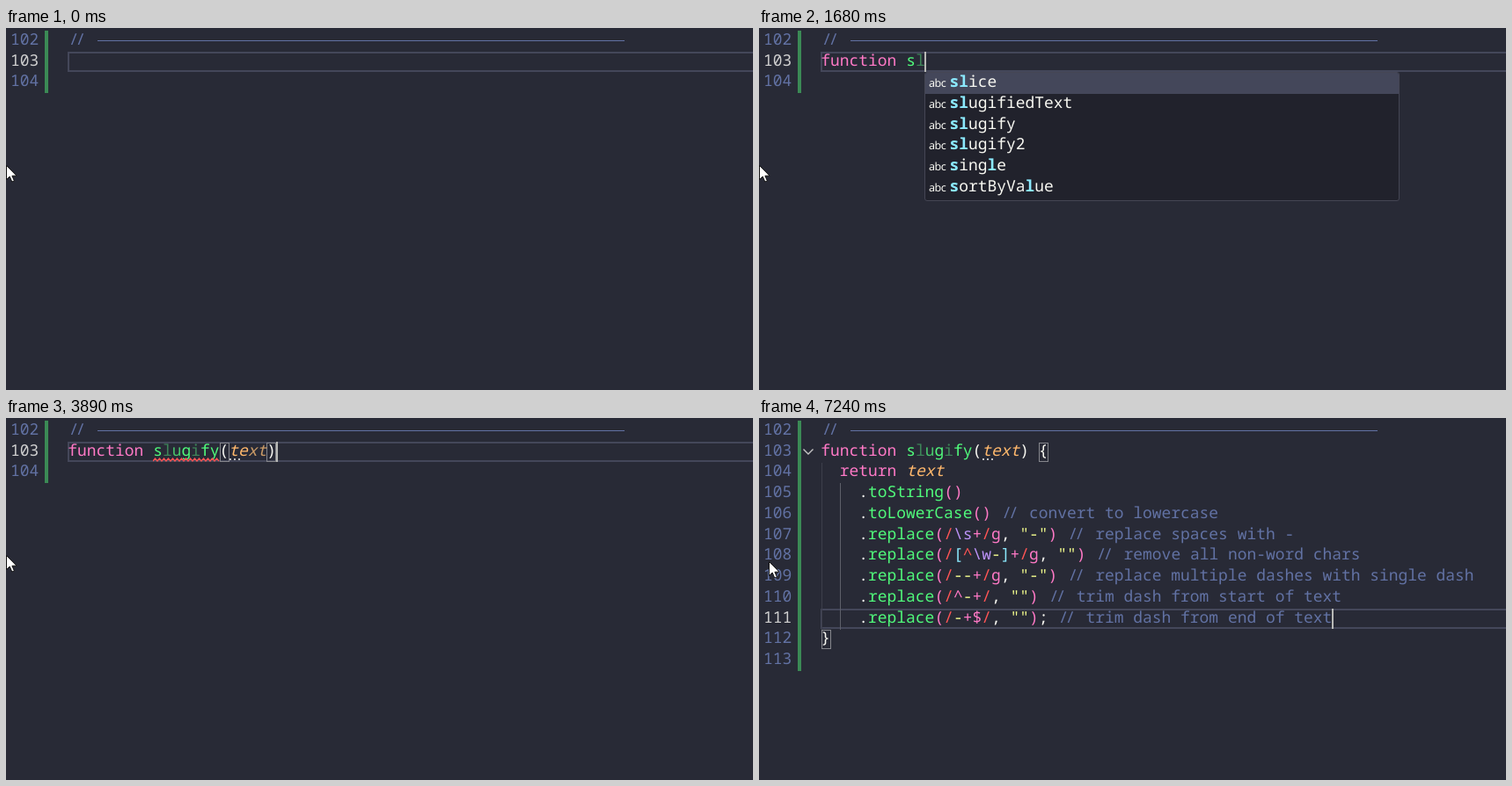
Write an HTML page that moves like this. It is 849x412 px and loops after 7310 ms.

```html
<!DOCTYPE html>
<html lang="en">
<head>
<meta charset="utf-8">
<title>Typing a slugify function</title>
<style>
  html, body { margin: 0; width: 100%; height: 100%; overflow: hidden; background: #282a36; }
  #stage {
    position: relative; width: 849px; height: 412px; overflow: hidden; background: #282a36;
    font: 17.93px/23.75px "Noto Sans Mono", "DejaVu Sans Mono", monospace;
    text-rendering: geometricPrecision; font-variant-ligatures: none; color: #f8f8f2;
  }
  #stage div, #stage span, #stage svg { position: absolute; white-space: pre; box-sizing: border-box; }
  #stage .hit { position: static; color: #8be9fd; font-weight: 700; }
  .w { color: #f8f8f2 } .p { color: #ff79c6 } .g { color: #50fa7b } .m { color: #48c56b }
  .h { color: #3d8458 } .r { color: #ff5555 } .v { color: #bd93f9 } .b { color: #8be9fd }
  .y { color: #f1fa8c } .c, .slash { color: #6272a4 } .ghost { color: #707179 }
  .o, .d, .q { color: #ffb86c; font-style: italic } .d { color: #a8825c } .q { color: #c99a66 }
  .slash { letter-spacing: -3px; padding-left: 1.5px }
  .num { left: 5px; color: #6272a4 } .num.on { color: #d0d0d0 }
  .bar { left: 44px; width: 4px; background: #3b8a55 }
  .row { left: 70px; width: 800px; height: 23px; border: 2px solid #44475a }
  .caret { width: 2px; height: 23px; background: #b8b9b6 }
  .match { width: 11px; height: 22px; border: 1px solid #85868c }
  .guide { width: 1px; background: #3c3e4a } .guide.on { background: #5d5f69 }
  .rule { left: 104px; top: 14px; width: 599px; height: 1px; background: #6272a4 }
  .dots { width: 13px; height: 2px; background: repeating-linear-gradient(90deg, #c0c0c0 0 2px, transparent 2px 5px) }
  .pop { top: 50px; width: 540px; background: #21222c; border: 1px solid #454654; border-radius: 3px; overflow: hidden }
  .item { left: 0; width: 538px; height: 23.75px } .item.sel { background: #44475a }
  .label { left: 27.5px; top: -.8px; font-weight: 500 }
  .info { right: 13px; top: -.8px; font-size: 15.2px; font-weight: 600; color: #adaeb0 }
  .abc { left: 4px; top: 0; font: 500 12.5px/23.75px "Noto Sans", sans-serif; letter-spacing: -.5px }
  .thumb { right: 0; top: 0; width: 13px; height: 193px; background: rgba(120, 122, 132, .28) }
  .ico { left: 2.5px; top: 2.5px; width: 20px; height: 20px; fill: none; stroke: #f8f8f2 }
  .ico.var { stroke: #75beff }
</style>
</head>
<body>
<div id="stage"><div id="view"></div>
  <svg id="mouse" width="16" height="24" viewBox="-1 -1 16 24" style="left:-1px">
    <path d="M.5.5V16.5L4.2 13 6.8 19 9.4 18 6.9 12.2H12z" fill="#fff" stroke="#111" />
  </svg>
</div>
<script>
const CW = 10.76, LH = 23.75, X0 = 71, Y0 = 3, LOOP = 7310;
const x = col => X0 + col * CW, y = row => Y0 + row * LH;
const raw = String.raw;

// Markup: @k starts a run in colour class k; @/ is a tight comment mark.
const note = text => `@/// @c${text}`;
const call = (re, str, end, text) =>
  `@w.@greplace@p(@r/${re}@w, @y"${str}"@p)@w${end} ${note(text)}`;
const BODY = [
  '@preturn @wtext',
  '@w.@gtoString@p()',
  '@w.@gtoLowerCase@p() ' + note('convert to lowercase'),
  call(raw`@v\s@p+@r/@pg`, '-', '', 'replace spaces with -'),
  call(raw`@b[@r^@v\w@y-@b]@p+@r/@pg`, '', '', 'remove all non-word chars'),
  call('@y--@p+@r/@pg', '-', '', 'replace multiple dashes with single dash'),
  call('@p^@y-@p+@r/', '', '', 'trim dash from start of text'),
  call('@y-@p+$@r/', '', ';', 'trim dash from end of text')
];
const NAME = ['@gs', '@hl', '@mu', '@gg', '@hi', '@gf', '@gy'];
const fn = n => '@pfunction ' + NAME.slice(0, n).join('');
const sig = arg => `${fn(7)}@w(${arg}@w)`;

// Suggestions: icon letter, label, optional detail.
const FUNC = ['k function', 's function|Function Statement', 'v Function',
  's async function|Async Function Statement', 'v netlifyFunctions|@astrojs/netlify',
  'v __isOptionsFunction|@tailwindcss/typography', 'v __isOptionsFunction|@tailwindcss/forms',
  'v netlifyEdgeFunctions|@astrojs/netlify', 's async arrow function|Async Function Expression',
  'v SVGComponentTransferFunctionElement'];
const FU = [...FUNC, 'v fullscreenElement', 'v fullscreenEnabled'];
const SL = ['a slice', 'a slugifiedText', 'a slugify', 'a slugify2', 'a single', 'a sortByValue'];
const TE = ['a text', 's test|testBlock', 's testa|testAsyncBlock', 'a the', 'a then', 'a timeZone',
  'a true', 'a typeof', 's tsrce|typescriptReactClassExportComponent', 'a toLowerCase',
  'a toUpperCase', 's tsrcredux|typescriptReactClassComponentRedux'];
const TEX = ['a text', 'a textContent', 'a slugifiedText'];
const ICONS = {
  k: ['', 'M10 3.5h5M12 6.5h2M1 6.5h9M1 12.5h11M1 9.5h6M10 9.5h5M1.5 2.5h6v2h-6z'],
  s: ['', 'M2.5 13V1.5h12V13M2 14.5h1m1 0h1m1 0h1m1 0h1m1 0h1m1 0h1m1 0h1'],
  v: ['var', 'M4 4.5H1.5v7H4M12 4.5h2.5v7H12M5 7.2l3.7-1.8 2.5 1.2v2.6l-3.8 2L5 10zl2.4 1.2 3.8-1.8M7.4 8.4v2.8']
};

// Each step changes part of the state; col is the caret column, match the boxed brackets.
const type = (code, col, word, list) => ({ code, col, word, list, caret: true });
const STEPS = [
  [0, { code: '', row: 1, col: 0, match: [], nums: 3 }],
  [260, type('@wf', 1)],
  [350, type('@wf', 1, 'f', FU)],
  [440, type('@wfu', 2, 'f', FU)],
  [530, type('@wfu', 2, 'fu', FU)],
  [670, type('@wfun', 3, 'fun', FU)],
  [800, type('@wfunc', 4, 'func', FUNC)],
  [1020, type('@wfunct', 5, 'funct', FUNC)],
  [1080, type('@wfuncti', 6, 'functi', FUNC)],
  [1150, type('@wfunctio', 7, 'functio', FUNC)],
  [1210, type(fn(0), 8, 'function', FUNC)],
  [1420, type(fn(0), 9)],
  [1550, type(fn(1), 10, 's', SL)],
  [1680, type(fn(2), 11, 'sl', SL)],
  [1810, type(fn(3), 12, 'slu', SL.slice(1, 4))],
  [1940, type(fn(4), 13, 'slug', SL.slice(1, 4))],
  [2070, type(fn(5), 14, 'slugi', SL.slice(1, 4))],
  [2200, type(fn(7), 16, 'slugify', SL.slice(2, 4))],
  [2460, type(sig(''), 17)],
  [2530, { match: [[1, 16], [1, 17]] }],
  [2730, { ...type(sig('@ot'), 18), match: [[1, 16], [1, 18]] }],
  [2800, { word: 't', list: TE }],
  [2870, { ...type(sig('@ote'), 19, 'te', TE), match: [[1, 16], [1, 19]] }],
  [2940, { ...type(sig('@otex'), 20, 'te', TE), match: [[1, 16], [1, 20]] }],
  [3010, { word: 'tex', list: TEX }],
  [3360, { ...type(sig('@otext'), 21, 'text', [TEX[0], TEX[2]]), match: [[1, 16], [1, 21]] }],
  [3430, { code: sig('@ote@qxt'), wave: true, dots: true }],
  [3890, type(sig('@ote@qxt'), 22)],
  [4290, type(sig('@ote@qxt') + ' ', 23)],
  [4380, { match: [] }],
  [4490, type(sig('@ote@qxt') + ' {}', 24)],
  [4560, { match: [[1, 23], [1, 24]] }],
  [4840, { ...type(sig('@ote@qxt') + ' {', 2), row: 2, nums: 5, close: 3, match: [[1, 23], [3, 0]] }],
  [4910, { ghost: true, wave: false, close: 10, match: [[1, 23], [10, 0]] }],
  [5110, { fold: true }],
  [5310, { code: sig('@dtext') + ' {', caret: false }],
  [5770, { ghost: false, body: BODY, nums: 12, row: 9, col: 54, caret: true }],
  [5900, { guides: true }],
  [6230, { code: sig('@otext') + ' {' }],
  [6330, { body: ['@preturn @otext', ...BODY.slice(1)] }],
  [6430, { caret: false }],
  [6890, { caret: true }],
  [7240, { moved: true }]
];
let state = {};
const STATES = STEPS.map(([t, change]) => [t, state = { ...state, ...change }]);

const box = (cls, left, top, style = '', inner = '') =>
  `<div class="${cls}" style="left:${left}px;top:${top}px;${style}">${inner}</div>`;

function text(row, col, markup, force) {
  const parts = markup.split(/@(.)/);
  let html = '';
  for (let i = 1; i < parts.length; i += 2) {
    const cls = force || (parts[i] === '/' ? 'slash' : parts[i]);
    html += box(cls, x(col) - .7, y(row) - 1.2, '', parts[i + 1]);
    col += parts[i + 1].length;
  }
  return html;
}

function highlight(label, word) {
  const low = label.toLowerCase(), start = low.indexOf(word);
  let n = 0;
  return [...label].map((ch, i) => {
    const hit = start >= 0 ? i >= start && i < start + word.length : low[i] === word[n] && ++n;
    return hit ? `<span class="hit">${ch}</span>` : ch;
  }).join('');
}

function icon(kind) {
  if (kind === 'a') return '<span class="abc">abc</span>';
  const [cls, d] = ICONS[kind];
  return `<svg class="ico ${cls}" viewBox="0 0 16 16"><path d="${d}"/></svg>`;
}

function popup(s) {
  const items = s.list.map((entry, i) => {
    const [label, info = ''] = entry.slice(2).split('|');
    return `<div class="item${i ? '' : ' sel'}" style="top:${i * LH}px">${icon(entry[0])}` +
      `<span class="label">${highlight(label, s.word)}</span><span class="info">${info}</span></div>`;
  }).join('');
  const thumb = s.list.length > 11 ? '<div class="thumb"></div>' : '';
  return `<div class="pop" style="left:${Math.round(69.2 + 10.8 * s.col)}px;` +
    `height:${s.list.length * LH + 4.5}px">${items}${thumb}</div>`;
}

// Suggested ghost lines carry no numbers and no change bar.
function gutter(s) {
  let html = '';
  for (let i = 0; i < s.nums; i++) {
    const row = s.ghost && i > 2 ? i + 7 : i;
    html += `<div class="num${row === s.row ? ' on' : ''}" style="top:${y(row) - 1.2}px">${102 + i}</div>`;
  }
  const bar = (from, rows) => `<div class="bar" style="top:${y(from)}px;height:${rows * LH}px"></div>`;
  return html + (s.ghost ? bar(0, 3) + bar(10, 2) : bar(0, s.nums));
}

function draw(s) {
  let html = gutter(s) + text(0, 0, '@///') + '<div class="rule"></div>';
  html += `<div class="row" style="top:${y(s.row) + .25}px"></div>`;
  if (s.close) html += box('guide', 71, y(2), `height:${(s.body ? 8 : 1) * LH}px`);
  if (s.body) html += box('guide' + (s.guides ? ' on' : ''), 92, y(3), `height:${7 * LH}px`);
  html += s.match.map(([r, c]) => box('match', x(c) - .5, y(r) + .75)).join('');
  html += text(1, 0, s.code);
  if (s.close) html += text(s.close, 0, '@w}');
  if (s.body || s.ghost)
    html += (s.body || BODY).map((l, i) => text(i + 2, i ? 4 : 2, l, s.ghost && 'ghost')).join('');
  if (s.wave)
    html += `<svg style="left:167px;top:45px" width="77" height="5"><path d="M0 4${'l2.5-3 2.5 3'.repeat(15)}" fill="none" stroke="#ff5555" stroke-width="1.2"/></svg>`;
  if (s.dots) html += box('dots', 254, 46);
  if (s.fold)
    html += '<svg style="left:49px;top:34px" width="14" height="9"><path d="M1.5 1.5 7 7l5.5-5.5" fill="none" stroke="#c5c5c5" stroke-width="1.4"/></svg>';
  if (s.caret) html += box('caret', x(s.col) - 1, y(s.row) + .25);
  if (s.list) html += popup(s);
  document.getElementById('view').innerHTML = html;
  document.getElementById('mouse').style.transform = s.moved ? 'translate(11px,162px)' : 'translate(0,155px)';
}

const begin = performance.now();
let shown = -1;
function tick() {
  const t = (performance.now() - begin) % LOOP;
  let i = STATES.length - 1;
  while (STATES[i][0] > t) i--;
  if (i !== shown) draw(STATES[shown = i][1]);
  requestAnimationFrame(tick);
}
tick();
</script>
</body>
</html>
```
